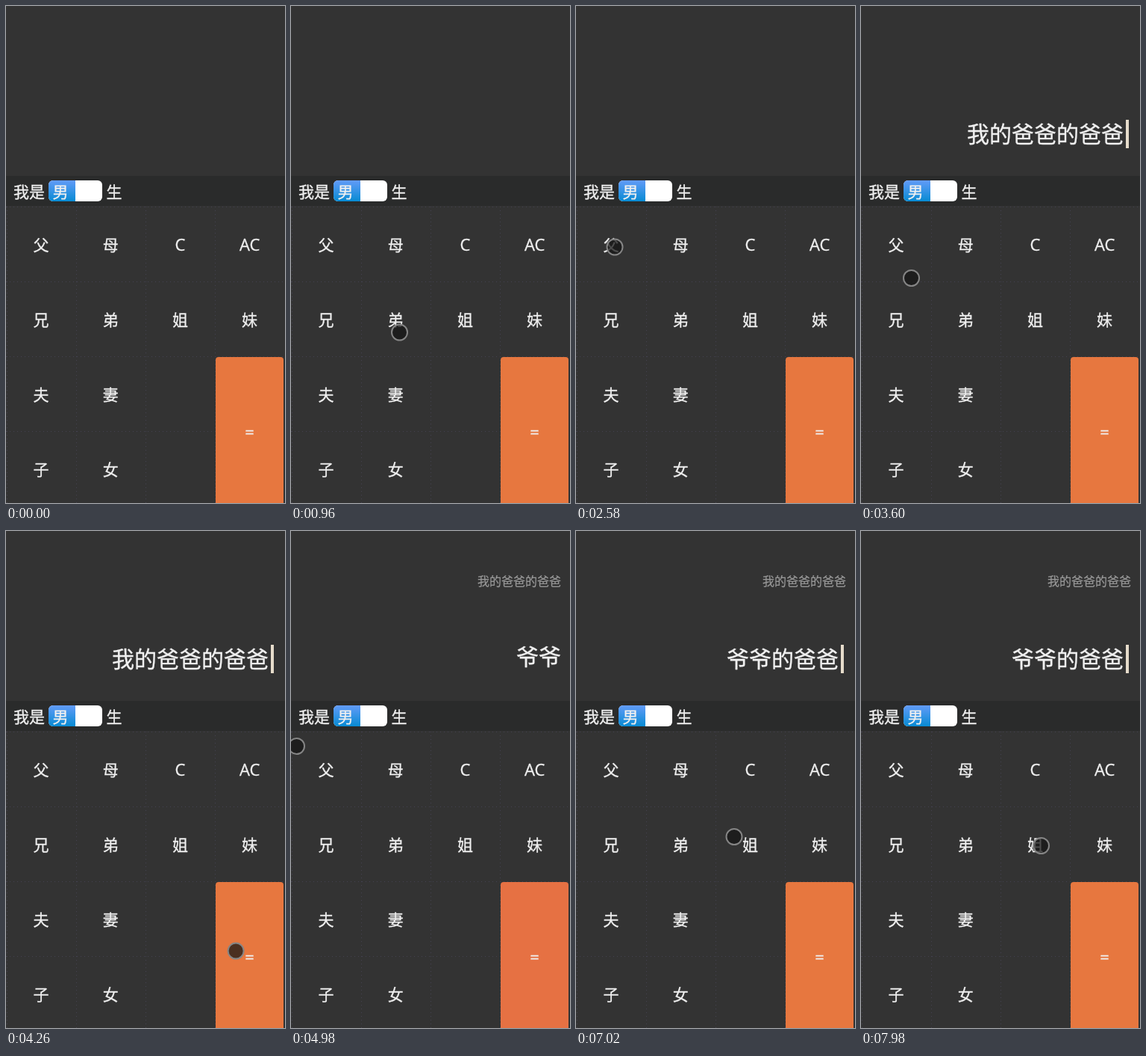
An HTML page for the animation above (8000 ms loop, 374 by 664 pixels).

```html
<!DOCTYPE html>
<html lang="zh-CN">
<head>
<meta charset="utf-8">
<title>亲戚计算器</title>
<style>
  html, body { margin: 0; width: 100%; height: 100%; overflow: hidden; background: #333; }
  svg { display: block; width: 374px; height: 664px; }
  text {
    font: 21px "Open Sans", "Noto Sans CJK SC", "Noto Sans CJK", sans-serif;
    color: #f0f0f0; fill: currentColor; stroke: currentColor; stroke-width: .35px;
  }
  .key { text-anchor: middle; }
  .latin { font-size: 22px; }
  .entry { font-size: 30px; text-anchor: end; }
  .history { font-size: 16px; text-anchor: end; color: #999; stroke-width: .2px; }
</style>
</head>
<body>
<svg viewBox="0 0 374 664">
  <defs>
    <linearGradient id="blue" x2="0" y2="1">
      <stop stop-color="#629bf8"/>
      <stop offset="1" stop-color="#078bd3"/>
    </linearGradient>
  </defs>
  <rect width="374" height="664" fill="#333"/>
  <rect y="227" width="374" height="40" fill="#2a2b2b"/>
  <g id="grid" fill="none" stroke="#504d66" stroke-dasharray="1 4" opacity=".6"></g>
  <text x="10" y="255.5">我是</text>
  <rect x="57" y="233" width="72" height="28" rx="6" fill="#fff"/>
  <path d="M93 233H63a6 6 0 0 0-6 6v16a6 6 0 0 0 6 6h30z" fill="url(#blue)"/>
  <text class="key" x="73" y="255.5">男</text>
  <text class="key" x="145" y="255.5">生</text>
  <rect id="equals" x="281" y="469" width="91" height="205" rx="4"/>
  <g id="keys"></g>
  <text id="history" class="history" x="362" y="72.5"></text>
  <text id="entry" class="entry"></text>
  <rect id="caret" x="355" y="152" width="4" height="38" fill="#e6dccb"/>
  <circle id="pointer" r="10.5" fill="#171717" fill-opacity=".75" stroke="#858585" stroke-width="2"/>
</svg>
<script>
const LOOP = 8000, STEP = 60, BLINK = 495;
const SHOW_RESULT = 4380, NEXT_ENTRY = 5580;
const $ = id => document.getElementById(id);

function add(parent, tag, attrs, text = "") {
  const el = document.createElementNS("http://www.w3.org/2000/svg", tag);
  for (const name in attrs) el.setAttribute(name, attrs[name]);
  el.textContent = text;
  parent.append(el);
}

function addKey(name, column, y) {
  const type = name < "a" ? "key latin" : "key";
  add($("keys"), "text", { class: type, x: 47 + column * 93.2, y }, name);
}

["父母CA", "兄弟姐妹", "夫妻", "子女"].forEach((row, r) => {
  [...row].forEach((name, c) => addKey(name === "A" ? "AC" : name, c, 326.5 + r * 100));
  add($("grid"), "path", { d: `M0 ${268.5 + r * 100}H374M${1.5 + r * 93} 268V664` });
});
addKey("=", 3, 577);

// Each pointer move: start, duration, destination
const moves = [
  [240, 600, 138, 478], [840, 120, 145.5, 436], [1080, 780, 105.5, 597.5],
  [1920, 660, 52, 322], [3540, 60, 67.5, 363.5], [3600, 720, 330, 579],
  [4440, 540, 7.5, 287.5], [4980, 360, 52.5, 326], [5940, 420, 147.5, 379.5],
  [6360, 360, 204, 395], [6780, 480, 220, 422], [7440, 240, 241.5, 420.5]
];

function pointerAt(t) {
  let x = 374, y = 112;
  for (const [start, duration, toX, toY] of moves) {
    const k = Math.min(1, Math.max(0, (t - start) / duration));
    x += (toX - x) * k;
    y += (toY - y) * k;
  }
  return [x, y];
}

function entryAt(t) {
  if (t >= NEXT_ENTRY) return "爷爷的爸爸";
  if (t >= SHOW_RESULT) return "爷爷";
  if (t >= 3120) return "我的爸爸的爸爸";
  return t >= 2760 ? "我的爸爸" : "";
}

// The caret restarts its blink on focus and on input
function caretAt(t) {
  const restart = [1080, 2760, 3120, 6000].filter(start => start <= t).pop();
  const focused = t < SHOW_RESULT || t >= 6000;
  return focused && Math.floor((t - restart) / BLINK) % 2 === 0;
}

const show = (id, visible) => $(id).style.display = visible ? "" : "none";

function render(t) {
  const isResult = t >= SHOW_RESULT && t < NEXT_ENTRY;
  $("entry").textContent = entryAt(t);
  $("entry").setAttribute("x", isResult ? 362 : 352);
  $("entry").setAttribute("y", isResult ? 178.5 : 181.5);
  $("history").textContent = t >= SHOW_RESULT ? "我的爸爸的爸爸" : "";
  $("equals").setAttribute("fill", isResult ? "#e67143" : "#e7773f");
  $("pointer").setAttribute("transform", `translate(${pointerAt(t)})`);
  show("pointer", t >= moves[0][0]);
  show("caret", caretAt(t));
}

const start = performance.now();
function tick() {
  const t = (performance.now() - start) % LOOP;
  render(Math.floor(t / STEP) * STEP);
  requestAnimationFrame(tick);
}
tick();
</script>
</body>
</html>
```
